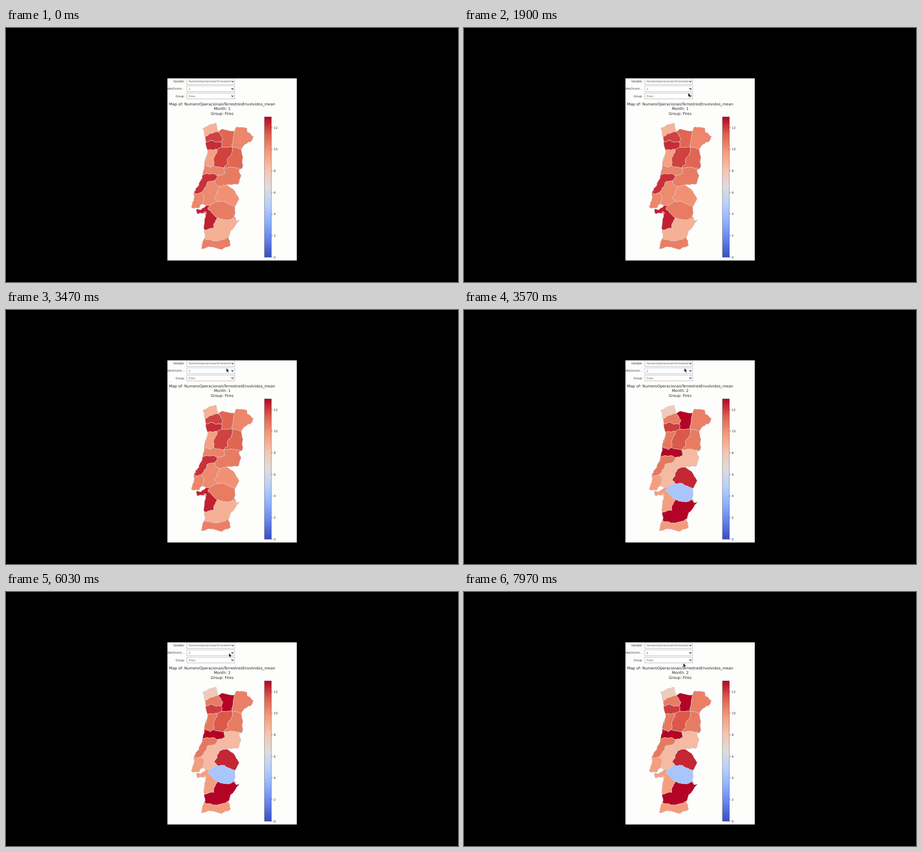
An HTML page that plays this animation: 998x561 px, repeating every 8 s.

```html
<!DOCTYPE html>
<html lang="en">
<head>
<meta charset="utf-8">
<title>District map</title>
<style>
html, body { margin: 0; width: 100%; height: 100%; overflow: hidden; background: #000; }
svg { display: block; width: 998px; height: 561px; }
text { text-rendering: geometricPrecision; }
.ui { font: 6.6px "Liberation Sans", Arial, sans-serif; fill: #3a3a3a; }
.val { font-size: 6.5px; fill: #5c5c5c; }
.plot { font: 8.32px "DejaVu Sans", sans-serif; fill: #222; text-anchor: middle; }
.tick { font: 6.9px "DejaVu Sans", sans-serif; fill: #333; }
</style>
</head>
<body>
<svg viewBox="0 0 998 561" xmlns="http://www.w3.org/2000/svg">
  <defs>
    <linearGradient id="ramp" x1="0" y1="1" x2="0" y2="0"></linearGradient>
    <clipPath id="panel"><rect x="356.4" y="111.3" width="285.6" height="402.3"/></clipPath>
    <clipPath id="field"><rect x="399" y="111" width="96.3" height="14"/></clipPath>
  </defs>
  <rect width="998" height="561"/>
  <g clip-path="url(#panel)">
    <rect x="356" y="111" width="287" height="403" fill="#fdfdfb"/>
    <g id="form"></g>
    <g class="plot">
      <text x="477.3" y="170.9">Map of: NumeroOperacionaisTerrestresEnvolvidos_mean</text>
      <text id="month" x="477.3" y="181.4"></text>
      <text x="477.3" y="191.9">Group: Fires</text>
    </g>
    <g id="map" stroke="#d0d0d0" stroke-width=".9" stroke-linejoin="round"></g>
    <rect x="570.8" y="196.2" width="15.2" height="310" fill="url(#ramp)" stroke="#333" stroke-width=".5"/>
    <g id="axis"></g>
    <path id="cursor" d="M0 0V8.6L2 6.8L3.5 10L4.9 9.4L3.5 6.3L6 6Z" fill="#111" stroke="#fff" stroke-width=".4"/>
  </g>
</svg>
<script>
const LOOP = 8000, MAX = 13;
const ENTER = 570, FOCUS = 950, PICK_2 = 2870, REDRAW = 3530, PICK_4 = 7630;
const $ = id => document.getElementById(id);

function add(parent, tag, attrs, text) {
  const el = document.createElementNS("http://www.w3.org/2000/svg", tag);
  for (const k in attrs) el.setAttribute(k, attrs[k]);
  if (text) el.textContent = text;
  parent.appendChild(el);
  return el;
}

// Diverging colour scale
const scale = ["3b4cc0", "6282ea", "8db0fe", "b8d0f9", "dddddd", "f5c4ad", "f49a7b", "de604d", "b40426"]
  .map(h => [0, 2, 4].map(i => parseInt(h.slice(i, i + 2), 16)));

function colour(value) {
  const p = value / MAX * (scale.length - 1);
  const i = Math.min(scale.length - 2, Math.floor(p));
  return `rgb(${scale[i].map((c, k) => Math.round(c + (scale[i + 1][k] - c) * (p - i)))})`;
}

scale.forEach((c, i) => add($("ramp"), "stop", { offset: i / (scale.length - 1), "stop-color": `rgb(${c})` }));
for (let v = 0; v < MAX; v += 2) {
  const y = 506.2 - v * 310 / MAX;
  add($("axis"), "path", { d: `M586 ${y}h2.6`, stroke: "#333", "stroke-width": .7 });
  add($("axis"), "text", { class: "tick", x: 591, y: y + 2.5 }, String(v));
}

// Form rows
const [, picker] = [
  ["Variable:", "NumeroOperacionaisTerrestresEnvolvidos_mean"], ["MesOcorre…", "1"], ["Group:", "Fires"]
].map(([label, value], i) => {
  const g = $("form"), y = 111.7 + i * 16.1;
  add(g, "text", { class: "ui", x: 394.6, y: y + 8.6, "text-anchor": "end" }, label);
  const box = add(g, "rect", { x: 399.3, y, width: 105.6, height: 12.8, fill: "#fff", stroke: "#a3a3a0", "stroke-width": .8 });
  const text = add(g, "text", { class: "ui val", x: 403.2, y: y + 8.7 }, value);
  if (!i) text.setAttribute("clip-path", "url(#field)");
  add(g, "path", { d: `M497.6 ${y + 5.2}l2.4 2.5l2.4 -2.5`, fill: "none", stroke: "#222", "stroke-width": 1.3 });
  return { box, text };
});

// Points where borders meet, called a to z, then A to E
const nodes = ("439,240 468,229 441,252 475,252 445,270 466,268 477,263 505,227 499,262 520,269 481,309 " +
  "458,304 438,302 520,311 434,325 467,326 486,347 474,350 461,337 415,363 430,364 466,383 450,392 " +
  "441,392 432,389 506,394 509,426 466,419 438,446 491,462 438,465").split(" ");

// Borders named by the two districts they part (0, 1: outside); few bends between two nodes
const borders = `
  V0 a 434,222 448,214 464,210 466,221 b; VB b 453,233 a; B0 a c; BP c 453,248 464,253 d; BR d 479,243 474,235 b;
  P0 c e; PA e f; PI f g; PR g d; R0 b 475,224 h; RN h 502,243 i; RI i g;
  N0 h 508,219 532,221 533,230 547,240 540,252 527,257 j; NG j 511,265 i;
  IG i 498,277 490,288 491,300 k; IC k l; IA l 461,284 f; A0 e 442,284 m; AC m 451,309 l;
  G0 j 522,290 n; GK n 494,307 k; C0 m o; CL o 462,323 p; CK k 483,321 p;
  K0 n 514,314 519,325 513,345 q; KT q r; KS r 463,345 s; KL s p;
  L0 o 426,347 t; LO t 422,367 u; LS u 442,350 444,341 s;
  ST r 466,362 460,376 v; SE v w; SU w x; S0 x y; SO y 437,376 437,370 u; O0 t 414,382 410,397 427,397 y;
  T0 q 498,354 515,377 z; TE z 483,383 v; E0 z 503,416 A; EJ A 501,419 490,424 B; EU B 457,411 446,401 w;
  U0 x 431,401 420,401 424,411 440,408 C; UJ C 459,443 460,431 B;
  J0 A 516,424 503,441 495,452 D; JF D 469,470 E; J1 E C; F0 D 496,479 477,490 455,484 431,488 E`;

// Mean value per district in month 1 and month 2
const means = {
  V: [8.8, 7.7], B: [11.9, 10.6], P: [12.3, 12], R: [11.2, 13], N: [10.3, 10.5], I: [11.9, 11.5],
  A: [9.5, 10.7], G: [11.2, 10.6], C: [10.4, 13], K: [10.6, 8.5], L: [12.2, 10.7], S: [10.2, 8.5],
  O: [10.3, 9.6], T: [10, 12.4], E: [10.6, 4.3], U: [12.5, 9.6], J: [8.9, 13], F: [10.5, 9.7]
};

let seed = 7;
const rand = () => (seed = seed * 16807 % 2147483647) / 2147483647 - .5;

// Midpoint displacement; returns the points after p up to q
function rough(p, q) {
  const dx = q[0] - p[0], dy = q[1] - p[1], len = Math.hypot(dx, dy);
  if (len < 5) return [q];
  const k = rand() * Math.min(.36, 3 / len);
  const mid = [p[0] + dx / 2 + dy * k, p[1] + dy / 2 - dx * k];
  return [...rough(p, mid), ...rough(mid, q)];
}

function point(word) {
  const i = "abcdefghijklmnopqrstuvwxyzABCDE".indexOf(word);
  return (i < 0 ? word : nodes[i]).split(",").map(Number);
}

const arcs = borders.split(";").map(line => {
  const [key, ...words] = line.trim().split(/\s+/);
  const pts = words.map(point);
  return { key, from: words[0], to: words[words.length - 1],
    pts: pts.flatMap((p, i) => i ? rough(pts[i - 1], p) : [p]) };
});

// Joins all borders of one district end to end
function ring(id) {
  const rest = arcs.filter(a => a.key.includes(id));
  let { pts, to } = rest.shift();
  while (rest.length) {
    const i = rest.findIndex(a => a.from === to || a.to === to);
    const [next] = rest.splice(i, 1);
    const ahead = next.from === to;
    pts = pts.concat(ahead ? next.pts : [...next.pts].reverse());
    to = ahead ? next.to : next.from;
  }
  return "M" + pts.map(p => p.map(n => n.toFixed(1)).join(" ")).join("L") + "Z";
}

const districts = Object.keys(means).map(id => ({ id, el: add($("map"), "path", { d: ring(id) }) }));
// Lagoon, estuary and islet
for (const d of ["M444 277L442.5 284L442 291", "M436 407L441 406L443 411", "M408.3 356.6l1.2 .8"])
  add($("map"), "path", { d, fill: "none", "stroke-width": 1.3 });

// Pointer moves: from time, to time, x, y; it rests in between
const moves = [
  [ENTER, 930, 485, 129], [970, 1070, 483, 154.5], [1150, 1370, 480, 128], [1470, 1600, 487, 130],
  [1770, 1980, 499, 150], [1980, 2200, 487, 139], [2430, 2600, 485.8, 152.5], [3130, 3350, 486.6, 128.5],
  [4430, 4530, 492.2, 135], [6030, 6270, 485, 186], [6500, 6670, 486, 178.2], [6970, 7200, 484.5, 176],
  [7900, 7970, 484.3, 157.3]
];

function pointer(t) {
  let x = 630, y = 440;
  for (const [a, b, u, v] of moves) {
    const f = Math.max(0, Math.min(1, (t - a) / (b - a))), e = f * f * (3 - 2 * f);
    x += (u - x) * e;
    y += (v - y) * e;
  }
  return `translate(${x.toFixed(2)},${y.toFixed(2)})`;
}

let shown = -1;
function draw(t) {
  const m = t < REDRAW ? 0 : 1;
  if (m !== shown) {
    shown = m;
    $("month").textContent = "Month: " + (m + 1);
    districts.forEach(d => d.el.setAttribute("fill", colour(means[d.id][m])));
  }
  picker.text.textContent = t < PICK_2 ? "1" : t < PICK_4 ? "2" : "4";
  picker.box.setAttribute("stroke", t < FOCUS ? "#a3a3a0" : "#86b4e0");
  $("cursor").setAttribute("visibility", t < ENTER ? "hidden" : "visible");
  $("cursor").setAttribute("transform", pointer(t));
}

let start;
function tick(now) {
  start ??= now;
  draw((now - start) % LOOP);
  requestAnimationFrame(tick);
}
draw(0);
requestAnimationFrame(tick);
</script>
</body>
</html>
```
